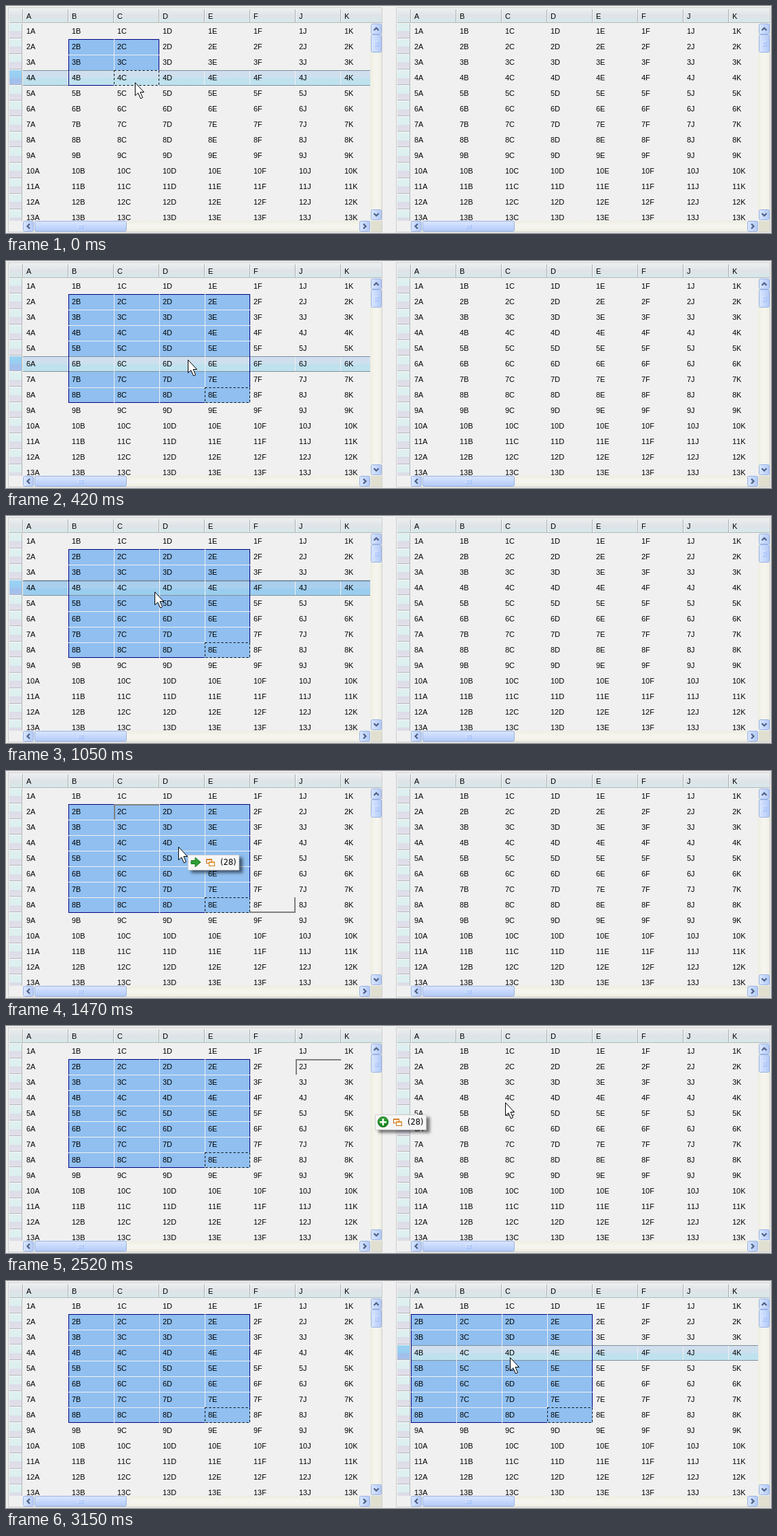
An HTML page with a canvas that plays this animation: 1128x336 px, repeating every 3570 ms.

```html
<!DOCTYPE html>
<html lang="en">
<head>
<meta charset="utf-8">
<title>Drag cells between grids</title>
<style>
html, body { margin: 0; width: 100%; height: 100%; overflow: hidden; background: #f0f0f0; }
canvas { display: block; }
</style>
</head>
<body>
<canvas id="stage" width="1128" height="336"></canvas>
<script>
const ctx = document.getElementById('stage').getContext('2d');
const COLS = 'ABCDEFJK';
const COL_W = 67, ROW_H = 23, LEFT = 25, TOP = 26, RIGHT = 538, BOTTOM = 318;
const SECOND = 572;
const STEP = 210, LOOP = 3570;
const SELECTED = '#90bff0', PAGE = '#f0f0f0';

const colX = c => LEFT + c * COL_W;
const rowY = r => TOP + (r - 1) * ROW_H;

// cursor position, hovered row, drag tip position, first column of the drop marker
const STEPS = [
  { at: [190, 113], hover: 4 },
  { at: [334, 194], hover: 8 },
  { at: [268, 146], hover: 6 },
  { at: [201, 110], hover: 4 },
  { at: [201, 110], hover: 4, pressed: true },
  { at: [219, 112], hover: 4, pressed: true },
  { at: [254, 112], tip: [262, 126], drop: 2, move: true },
  { at: [254, 112], tip: [268, 124], drop: 2, move: true },
  { at: [254, 112], tip: [268, 124], drop: 2 },
  { at: [340, 112], tip: [271, 124], drop: 2 },
  { at: [420, 111], tip: [367, 124], drop: 3 },
  { at: [645, 112], tip: [459, 124], drop: 5 },
  { at: [736, 113], tip: [544, 131], drop: 6 },
  { at: [743, 113], tip: [751, 128], drop: 0, second: true },
  { at: [743, 113], tip: [757, 125], drop: 0, second: true },
  { at: [743, 113], hover: 4, second: true, dropped: true }
];

function rect(x, y, w, h, fill) {
  ctx.fillStyle = fill;
  ctx.fillRect(x, y, w, h);
}

function frame(x, y, w, h, color) {
  ctx.strokeStyle = color;
  ctx.lineWidth = 1;
  ctx.strokeRect(x + .5, y + .5, w - 1, h - 1);
}

function poly(points, fill, stroke) {
  ctx.beginPath();
  points.forEach(([x, y]) => ctx.lineTo(x, y));
  ctx.closePath();
  ctx.fillStyle = fill;
  ctx.fill();
  ctx.strokeStyle = stroke;
  ctx.lineWidth = 1;
  ctx.stroke();
}

function gradient(x0, y0, x1, y1, ...colors) {
  const g = ctx.createLinearGradient(x0, y0, x1, y1);
  colors.forEach((c, i) => g.addColorStop(i / (colors.length - 1), c));
  return g;
}

// two gradients that meet at a hard edge halfway down
function glossy(y, h, a, b, c, d) {
  const g = ctx.createLinearGradient(0, y, 0, y + h);
  [[0, a], [.5, b], [.5, c], [1, d]].forEach(stop => g.addColorStop(...stop));
  return g;
}

function label(text, x, y) {
  ctx.fillStyle = '#000';
  ctx.font = '11px "Liberation Sans", Arial, sans-serif';
  ctx.fontKerning = 'none';
  ctx.fillText(text, x, y);
}

function scrollBox(x, y, w, h) {
  const across = w > h ? [x, y, x, y + h] : [x, y, x + w, y];
  ctx.beginPath();
  ctx.roundRect(x + .5, y + .5, w - 1, h - 1, 2);
  ctx.fillStyle = gradient(...across, '#dbe7ff', '#c6d8fc', '#b2c8f4');
  ctx.fill();
  ctx.strokeStyle = '#9bb4e2';
  ctx.lineWidth = 1;
  ctx.stroke();
}

function arrowButton(x, y, angle) {
  scrollBox(x, y, 16, 16);
  ctx.save();
  ctx.translate(x + 8, y + 8);
  ctx.rotate(angle);
  ctx.beginPath();
  ctx.moveTo(-3.5, 2);
  ctx.lineTo(0, -1.5);
  ctx.lineTo(3.5, 2);
  ctx.strokeStyle = '#4d6185';
  ctx.lineWidth = 2.2;
  ctx.stroke();
  ctx.restore();
}

function scrollBars() {
  const track = ['#eeede0', '#f5f4ec', '#f5f4ee', '#eeede0'];
  rect(RIGHT - 1, TOP, 17, BOTTOM - TOP, gradient(RIGHT - 1, 0, RIGHT + 16, 0, ...track));
  rect(LEFT, BOTTOM, RIGHT - LEFT, 16, gradient(0, BOTTOM, 0, BOTTOM + 16, ...track));
  rect(RIGHT, BOTTOM, 16, 16, '#e0dfd0');
  arrowButton(RIGHT, 26, 0);
  arrowButton(RIGHT, 301, Math.PI);
  arrowButton(LEFT, BOTTOM, -Math.PI / 2);
  arrowButton(521, BOTTOM, Math.PI / 2);
  scrollBox(RIGHT, 42, 16, 27);
  scrollBox(42, BOTTOM, 136, 16);
  for (let i = 0; i < 4; i++) {
    rect(RIGHT + 5, 52 + i * 2, 6, 1, '#eef4fe');
    rect(RIGHT + 6, 53 + i * 2, 6, 1, '#8cb0f8');
    rect(106 + i * 2, BOTTOM + 5, 1, 6, '#eef4fe');
    rect(107 + i * 2, BOTTOM + 6, 1, 6, '#8cb0f8');
  }
}

function headers(hover) {
  rect(5, 4, 549, 21, gradient(0, 4, 0, 25, '#ecefef', '#dfe3e8', '#d5e9ea'));
  rect(5, 24, 549, 1, '#b4b8b8');
  for (let c = 0; c < COLS.length; c++) {
    rect(colX(c) - 1, 5, 1, 19, '#a9adad');
    rect(colX(c), 5, 1, 19, '#fafafa');
    label(COLS[c], colX(c) + 5, 19);
  }

  for (let r = 1; r <= 13; r++) {
    const y = rowY(r);
    const h = Math.min(ROW_H, BOTTOM - y);
    const colors = r === hover
      ? ['#9bd2f2', '#98ccf0', '#a0bfec', '#a8c0ea']
      : ['#dff0f0', '#dcefef', '#dcdce8', '#e3e0ea'];
    rect(5, y, 19, h, glossy(y, ROW_H, ...colors));
    if (h === ROW_H) {
      rect(5, y + 21, 19, 1, '#b4b6ba');
      rect(5, y + 22, 19, 1, '#fafafa');
    }
  }
  rect(23, TOP, 1, BOTTOM - TOP, '#b4b8b8');
}

function box(c0, r0, c1, r1) {
  return [colX(c0), rowY(r0), (c1 - c0 + 1) * COL_W, (r1 - r0 + 1) * ROW_H];
}

// the gaps between cells also cut through the outline
function selectionGaps(c0, r0, c1, r1, hover) {
  const [x, y, w, h] = box(c0, r0, c1, r1);
  for (let c = c0 + 1; c <= c1; c++) rect(colX(c), y, 1, h, PAGE);
  for (let r = r0 + 1; r <= r1; r++) {
    if (r !== hover && r !== hover + 1) rect(x, rowY(r), w, 1, PAGE);
  }
}

function focusCell(c, r, back) {
  const cell = box(c, r, c, r);
  frame(...cell, back);
  ctx.setLineDash([3, 3]);
  frame(...cell, '#000');
  ctx.setLineDash([]);
}

function hoverRow(row, pressed, selection) {
  const y = rowY(row), w = RIGHT - 1 - LEFT;
  const colors = pressed
    ? ['#a9cdec', '#abd0ee', '#9bcdee', '#9bceee']
    : ['#d0dfee', '#cddfee', '#bee1ee', '#bfe2ee'];
  rect(LEFT, y, w, ROW_H, glossy(y, ROW_H, ...colors));
  for (let c = 1; c < COLS.length; c++) {
    const inside = selection && c > selection[0] && c <= selection[2];
    if (!inside) rect(colX(c) - 1, y + 1, 1, ROW_H - 2, PAGE);
  }
  rect(LEFT, y, w, 1, '#7f8f9b');
  if (pressed) rect(LEFT, y + 1, w, 1, '#7d9db6');
  rect(LEFT, y + ROW_H - 1, w, 1, '#7f8f9b');
}

function dropMarker(col) {
  const x0 = colX(col), y0 = rowY(2), x1 = colX(col + 4), y1 = rowY(9);
  const gray = '#808080';
  rect(x0, y0, COL_W, 2, gray);
  rect(x0, y0, 2, ROW_H, gray);
  rect(x1 - COL_W - 1, y1 - 2, COL_W + 1, 2, gray);
  rect(x1 - 2, y1 - ROW_H, 2, ROW_H, gray);
}

function grid(offset, { selection, hover, pressed, drop, dropped }) {
  ctx.save();
  ctx.translate(offset, 0);
  frame(3, 2, 552, 333, '#cfcfcf');
  headers(hover);
  ctx.save();
  ctx.beginPath();
  ctx.rect(LEFT - 1, TOP, RIGHT - LEFT, BOTTOM - TOP);
  ctx.clip();
  if (selection) rect(...box(...selection), SELECTED);
  if (hover) hoverRow(hover, pressed, selection);
  if (selection) {
    frame(...box(...selection), '#000080');
    selectionGaps(...selection, hover);
    focusCell(selection[2], selection[3], hover === selection[3] ? '#c8e0ee' : SELECTED);
  }
  for (let r = 1; r <= 13; r++) {
    for (let c = 0; c < COLS.length; c++) {
      const copied = dropped && c < 4 && r >= 2 && r <= 8;
      label(r + COLS[copied ? c + 1 : c], colX(c) + 5, rowY(r) + 15);
    }
  }
  if (drop !== undefined) dropMarker(drop);
  ctx.restore();
  scrollBars();
  ctx.restore();
}

function dragTip([x, y], move) {
  ctx.save();
  ctx.translate(x, y);
  ctx.shadowColor = 'rgba(0,0,0,.5)';
  ctx.shadowBlur = 4;
  ctx.shadowOffsetX = 5;
  ctx.shadowOffsetY = 4;
  rect(0, 0, 76, 23, '#f6f6f6');
  ctx.shadowColor = 'transparent';
  frame(0, 0, 76, 23, '#d0d0d0');

  if (move) {
    poly([[5, 8.5], [11, 8.5], [11, 4], [19, 11], [11, 18], [11, 13.5], [5, 13.5]], '#2f9e35', '#17751d');
  } else {
    ctx.beginPath();
    ctx.arc(12, 11, 7.7, 0, Math.PI * 2);
    ctx.fillStyle = gradient(0, 3, 0, 19, '#3aa53c', '#108018');
    ctx.fill();
    ctx.strokeStyle = '#0c6a14';
    ctx.lineWidth = .8;
    ctx.stroke();
    rect(7, 10, 10, 2.5, '#fff');
    rect(10.75, 6.25, 2.5, 10, '#fff');
  }

  rect(27, 6, 9, 7, '#fff6e4');
  frame(27, 6, 9, 7, '#c9651c');
  rect(27, 6, 9, 2, '#d9822b');
  rect(31, 10, 9, 7, '#fffbe8');
  frame(31, 10, 9, 7, '#c9781c');
  rect(31, 10, 9, 2, '#e0962f');

  ctx.fillStyle = '#000';
  ctx.font = '11.5px "DejaVu Sans", Verdana, sans-serif';
  ctx.fillText('(28)', 48, 15);
  ctx.restore();
}

function cursor([x, y]) {
  ctx.save();
  ctx.translate(x + .5, y + .5);
  poly([[0, 0], [0, 19], [4.3, 15.3], [8, 23.5], [11, 22], [7.5, 14], [13, 14]], '#fff', '#000');
  ctx.restore();
}

function draw(now) {
  const index = Math.min(STEPS.length - 1, Math.floor(now % LOOP / STEP));
  const step = STEPS[index];
  const first = { selection: index ? [1, 2, 4, 8] : [1, 2, 2, 4] };
  const second = { selection: step.dropped && [0, 2, 3, 8], dropped: step.dropped };
  const { hover, pressed, drop } = step;
  Object.assign(step.second ? second : first, { hover, pressed, drop });

  rect(0, 0, 1128, 336, PAGE);
  grid(0, first);
  grid(SECOND, second);
  if (step.tip) dragTip(step.tip, step.move);
  cursor(step.at);
}

const start = performance.now();
function tick() {
  draw(performance.now() - start);
  requestAnimationFrame(tick);
}
tick();
</script>
</body>
</html>
```
